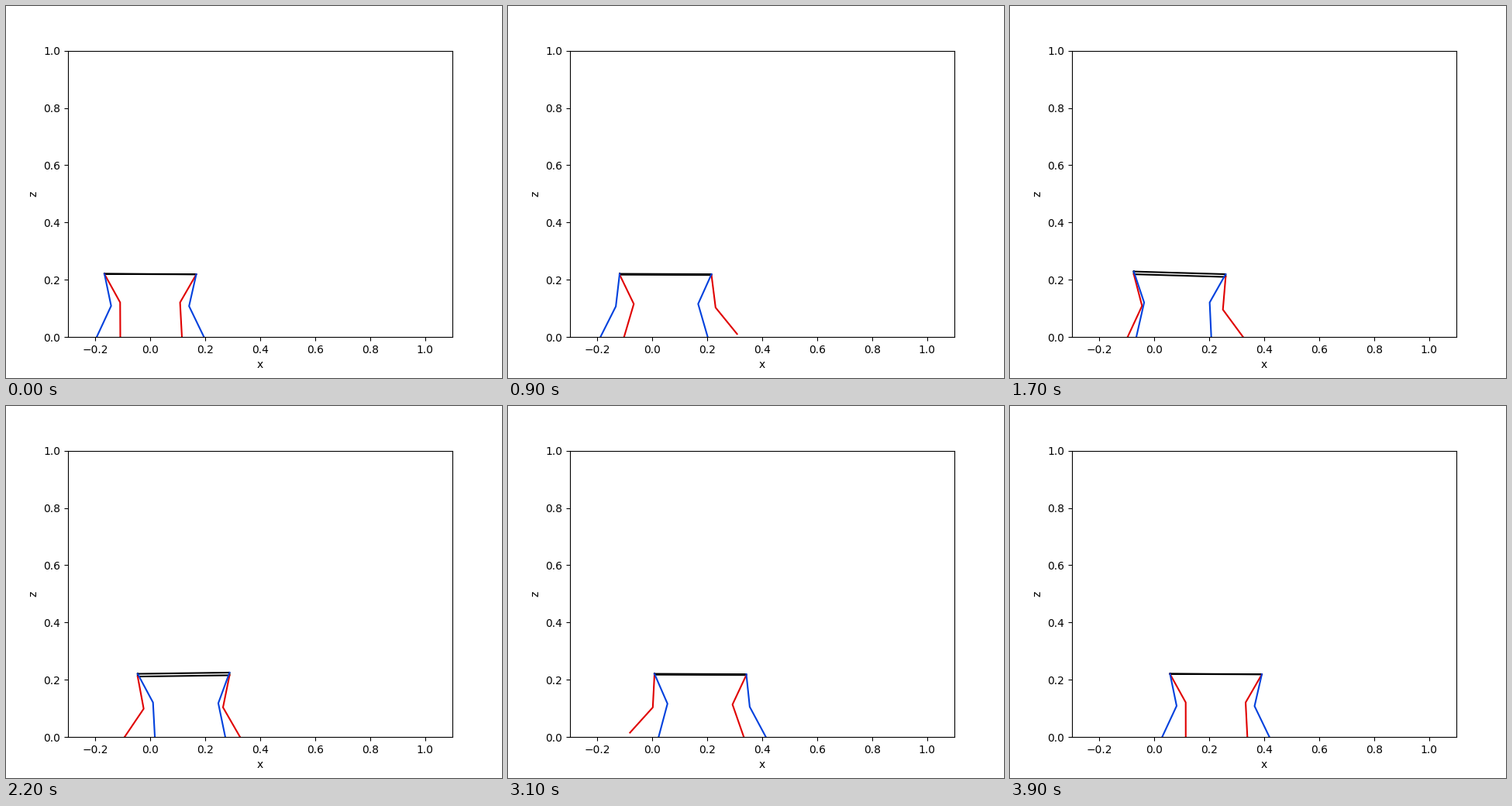
Recreate the animation shown at these times as a matplotlib script. Size 640 by 480 pixels, loop 4000 ms.

```python
import matplotlib.pyplot as plt
import numpy as np
from matplotlib.animation import FuncAnimation

FRAMES = 40
BODY = 0.3345
UPPER, LOWER = 0.1145, 0.121
SLIP, STRIDE, LIFT = 0.0007, 0.1965, 0.018
RED, BLUE = "#e00000", "#0040dd"

# colour, is_front, starting foot x, swing start, swing length
LEGS = [
    (RED, False, -0.1095, 30.8, 8.0),
    (RED, True, 0.1149, 0.4, 9.4),
    (BLUE, False, -0.1956, 13.0, 8.0),
    (BLUE, True, 0.1953, 20.1, 7.6),
]


def ease(u):
    u = np.clip(u, 0, 1)
    return u * u * (3 - 2 * u)


def pulse(t, on, off, edge):
    """Smooth 0-1-0 switch whose edges begin at on and off."""
    return ease((t - on) / edge) * (1 - ease((t - off) / edge))


def bump(s, width):
    return np.sqrt(np.sin(np.pi * s / width)) if 0 < s < width else 0.0


def trunk(t):
    """Far and near hip pairs; the body leans and pitches as blue legs swing."""
    x = -0.1673 + 0.00575 * t - 0.0055 * np.sin(np.pi * t / (FRAMES - 1))
    rear = 0.2208 + 0.0081 * pulse(t, 9, 18, 4)
    front = 0.2195 + 0.0064 * pulse(t, 18, 25, 5)
    gap = 0.0006 + 0.0089 * pulse(t, 7, 27, 6)
    far = np.array([[x, rear], [x + BODY, front]])
    return far, far - [0, gap]


def foot(t, x0, start, length):
    u = np.clip((t - start) / length, 0, 1)
    s = (u + np.sin(np.pi * u / 2)) / 2
    z = LIFT * (bump(s, 0.12) + bump(1 - s, 0.4))
    return np.array([x0 + SLIP * t + STRIDE * s, z])


def knee(hip, toe, side):
    """Two-link joint position, bent forward (+1) or backward (-1)."""
    reach = toe - hip
    d = np.hypot(*reach)
    ux, uz = reach / d
    along = (UPPER**2 - LOWER**2 + d**2) / (2 * d)
    off = side * np.sqrt(max(0, UPPER**2 - along**2))
    return hip + along * np.array([ux, uz]) + off * np.array([-uz, ux])


fig, ax = plt.subplots(figsize=(6.4, 4.8), dpi=100)
ax.set(xlim=(-0.3, 1.1), ylim=(0, 1), xlabel="x", ylabel="z")
body_line, = ax.plot([], [], color="black", lw=1.5)
leg_lines = [ax.plot([], [], color=leg[0], lw=1.5)[0] for leg in LEGS]


def update(t):
    far, near = trunk(t)
    body_line.set_data(*np.array([far[0], far[1], near[1], near[0], far[0]]).T)
    for line, (color, is_front, x0, start, length) in zip(leg_lines, LEGS):
        hip = (near if color == RED else far)[int(is_front)]
        toe = foot(t, x0, start, length)
        joint = knee(hip, toe, -1 if is_front else 1)
        line.set_data(*np.array([hip, joint, toe]).T)
    return [body_line, *leg_lines]


anim = FuncAnimation(fig, update, frames=FRAMES, interval=100, repeat=True)
plt.show()
```
